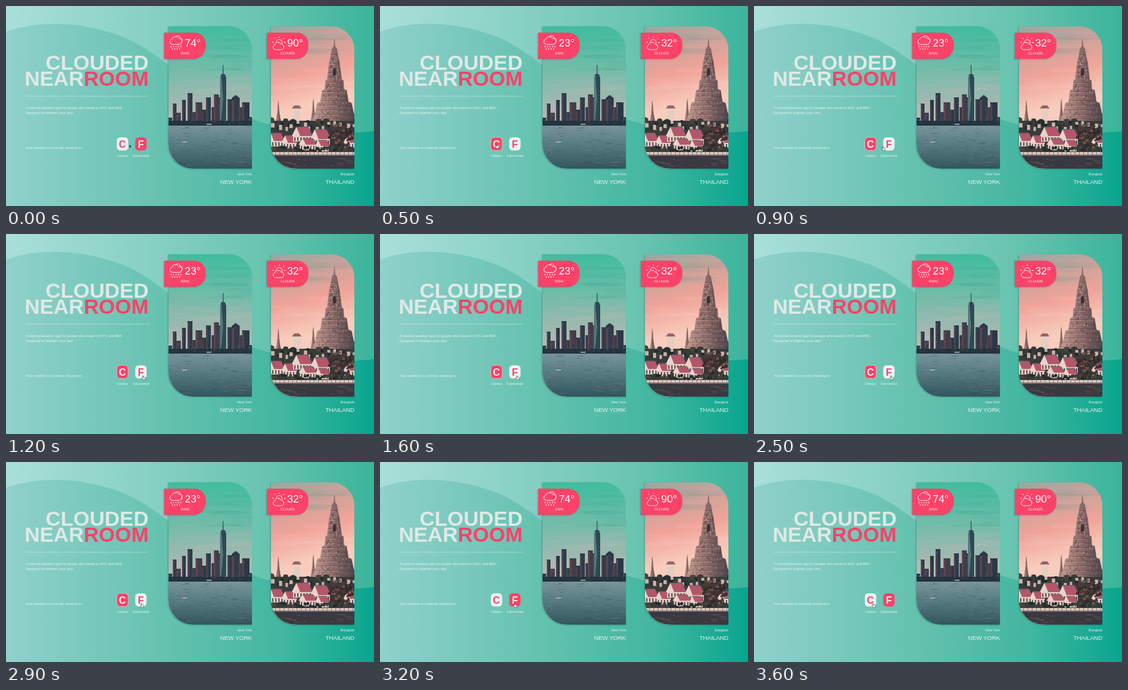
Animation of 600 by 326 pixels, one loop 3700 ms. Source, as an HTML page:

```html
<!DOCTYPE html>
<html lang="en">
<head>
<meta charset="utf-8">
<title>Weather app</title>
<style>
html, body { margin: 0; width: 100%; height: 100%; overflow: hidden; background: #6fc5b3; }
svg { display: block; width: 100vw; height: 100vh; }
text { font-family: "Liberation Sans", Arial, sans-serif; fill: #e6f3ef; font-size: 5.7px; }
.title { font-size: 34px; font-weight: bold; text-anchor: end; fill: #dfe9e7; }
.title tspan { fill: #fc4268; }
.temp { font-size: 17px; fill: #fff; }
.sky { text-anchor: middle; fill: #fff; }
.place { text-anchor: end; }
.big { font-size: 9.9px; letter-spacing: -.2px; }
.mid { text-anchor: middle; }
.key { font-size: 16px; font-weight: bold; text-anchor: middle; }
.icon { fill: none; stroke: #fff; stroke-width: .9; stroke-linecap: round; stroke-linejoin: round; }
.card { filter: drop-shadow(-1px 1.5px 1.2px rgba(0, 50, 45, .3)); }

.cel, .fah, .arrow, .hand { animation: 3700ms step-end infinite; }
.cel { animation-name: cel; }
.fah { animation-name: fah; }
.arrow { animation-name: arrow; }
.hand { animation-name: hand; }
.cursor { animation: move 3700ms infinite; }
@keyframes cel { 0% { opacity: 0 } 10.811% { opacity: 1 } 81.081%, 100% { opacity: 0 } }
@keyframes fah { 0% { opacity: 1 } 10.811% { opacity: 0 } 81.081%, 100% { opacity: 1 } }
@keyframes arrow { 0% { opacity: 1 } 2.703%, 100% { opacity: 0 } }
@keyframes hand { 0% { opacity: 0 } 2.703%, 100% { opacity: 1 } }
@keyframes move {
  0% { transform: translate(201px, 225.5px); animation-timing-function: steps(3) }
  8.108%, 16.216% { transform: translate(189px, 225.5px); animation-timing-function: steps(5) }
  29.73%, 72.973% { transform: translate(222.5px, 231px); animation-timing-function: steps(3) }
  81.081%, 89.189% { transform: translate(218.5px, 230px); animation-timing-function: steps(3) }
  97.297%, 100% { transform: translate(193.5px, 230.5px); animation-timing-function: step-end }
}
</style>
</head>
<body>
<svg viewBox="0 0 600 326" preserveAspectRatio="none">
  <defs>
    <linearGradient id="back"><stop stop-color="#a9dfda"/><stop offset=".4" stop-color="#86d0c3"/><stop offset=".72" stop-color="#66c3ae"/><stop offset="1" stop-color="#3ab49b"/></linearGradient>
    <linearGradient id="wave"><stop stop-color="#90d1cb"/><stop offset=".45" stop-color="#63c1ae"/><stop offset=".75" stop-color="#42b6a0"/><stop offset="1" stop-color="#08a58e"/></linearGradient>
    <linearGradient id="dusk" x2="0" y2="1"><stop stop-color="#40bd9c"/><stop offset=".4" stop-color="#6fbca8"/><stop offset=".75" stop-color="#a0b8b0"/><stop offset="1" stop-color="#bfb8b5"/></linearGradient>
    <linearGradient id="bay" x2="0" y2="1"><stop stop-color="#7b979b"/><stop offset=".4" stop-color="#5b7f86"/><stop offset="1" stop-color="#33555c"/></linearGradient>
    <linearGradient id="rose" x2=".15" y2="1"><stop stop-color="#91aaa3"/><stop offset=".2" stop-color="#cda39b"/><stop offset=".38" stop-color="#f0a399"/><stop offset=".62" stop-color="#f8cdbd"/></linearGradient>
    <linearGradient id="stone"><stop stop-color="#c79e92"/><stop offset=".45" stop-color="#8f6c69"/><stop offset="1" stop-color="#4b4149"/></linearGradient>
    <path id="frame" d="M0 0H98A38 38 0 0 1 136 38V232H40A40 40 0 0 1 0 192Z"/>
    <clipPath id="clip"><use href="#frame"/></clipPath>
    <path id="badge" d="M0 0H49A18 18 0 0 1 67.500 18V22.500A20 20 0 0 1 47.500 42.500H0Z" fill="#fd4268"/>
  </defs>

  <rect width="600" height="326" fill="url(#back)"/>
  <path d="M0 42C40 27 110 20 190 50C260 78 320 155 401 184C460 206 530 211 600 204V326H0Z" fill="url(#wave)"/>

  <text class="title" x="232.500" y="104">CLOUDED</text>
  <text class="title" x="232.500" y="130">NEAR<tspan>ROOM</tspan></text>
  <path d="M32 147H233" stroke="#fff" stroke-opacity=".45" stroke-width=".8"/>
  <text x="32" y="168">A minimal weather app for people who based in NYC and BKK.</text>
  <text x="32" y="176.200">Designed to brighten your day!</text>
  <text x="32" y="233">Your weather is currently showing in:</text>
  <text class="mid" x="190" y="245.500">Celsius</text>
  <text class="mid" x="220" y="245.500">Fahrenheit</text>

  <g transform="translate(265 33)">
    <use class="card" href="#frame" fill="url(#dusk)"/>
    <g id="harbour" clip-path="url(#clip)">
      <rect width="136" height="162" fill="url(#dusk)"/>
      <rect y="160" width="136" height="72" fill="url(#bay)"/>
    </g>
  </g>
  <g transform="translate(432 33)">
    <use class="card" href="#frame" fill="url(#rose)"/>
    <g id="temple" clip-path="url(#clip)">
      <rect width="136" height="232" fill="url(#rose)"/>
    </g>
  </g>

  <use class="card" href="#badge" x="258" y="43.500"/>
  <use class="card" href="#badge" x="425.500" y="43.500"/>
  <g class="icon">
    <path d="M271 62.500A4.300 4.300 0 0 1 270.500 54A6 6 0 0 1 281.500 53A4.800 4.800 0 0 1 283 62.500Z"/>
    <path d="M276 50.500A4.500 4.500 0 0 1 284.200 52A4.300 4.300 0 0 1 285 60"/>
    <path d="M269 65V67M273 65V67M277 65V67M281 65V67M285 65V67M271 69V71M275 69V71M279 69V71M283 69V71" stroke-width="1"/>
    <path d="M438.500 71A4.200 4.200 0 0 1 438 63.200A5.800 5.800 0 0 1 448.500 62A4.800 4.800 0 0 1 450.500 71Z"/>
    <path d="M440.500 58.500A5 5 0 1 1 450 61.500M445.500 50V51.500M437.500 52L439 53.500M453.500 52L452 53.500M434.500 59H436.500M453.500 59.500H455.500M452 65L453.500 66.500"/>
  </g>
  <text class="sky" x="292" y="78.700">RAIN</text>
  <text class="sky" x="459" y="78.700">CLOUDS</text>

  <text class="place" x="401" y="276">New York</text>
  <text class="place big" x="401" y="289.500">NEW YORK</text>
  <text class="place" x="568" y="276">Bangkok</text>
  <text class="place big" x="568" y="289.500">THAILAND</text>

  <g id="states"></g>

  <g class="cursor">
    <path class="arrow" d="M0 0V6L1.400 4.800L2.300 6.800L3.200 6.400L2.300 4.400H4.200Z" fill="#111" stroke="#fff" stroke-width=".4"/>
    <path class="hand" d="M.4 .6Q1.100 -.2 1.700 .6V2.600L4.300 3.200Q5 3.500 4.800 4.500L4.200 6.700H1.200L-.9 4.200Q-.7 3.300 .4 4Z" fill="#fff" stroke="#222" stroke-width=".6"/>
  </g>
</svg>
<script>
const get = id => document.getElementById(id);
const add = (id, markup) => get(id).insertAdjacentHTML('beforeend', markup);
const rect = (x, y, w, h, fill, more = '') =>
  `<rect x="${x}" y="${y}" width="${w}" height="${h}" fill="${fill}" ${more}/>`;
const path = (d, fill, more = '') => `<path d="${d}" fill="${fill}" ${more}/>`;
const blob = (x, y, rx, ry, fill, more = '') =>
  `<ellipse cx="${x}" cy="${y}" rx="${rx}" ry="${ry}" fill="${fill}" ${more}/>`;

let seed = 7;
const rand = (lo = 0, hi = 1) => {
  seed = (seed * 16807) % 2147483647;
  return lo + (hi - lo) * seed / 2147483647;
};
const pick = list => list[Math.floor(rand(0, list.length))];
const many = (n, make) => Array.from({ length: n }, (_, i) => make(i)).join('');
const haze = (n, top, bottom, fill) => many(n, () =>
  blob(rand(0, 136), rand(top, bottom), rand(20, 50), rand(1.5, 4), fill, 'opacity=".1"'));

// Temperature and unit buttons, one layer per unit
function layer(cls, temps, celsius) {
  const key = (x, letter, on) =>
    rect(x, 214, 18.5, 21.5, on ? '#fd4268' : '#ebf1f0',
      `rx="5.500" stroke="#fff" stroke-opacity="${on && celsius ? .6 : 0}" stroke-width=".7"`) +
    `<text class="key" x="${x + 9.2}" y="230.500" style="fill:${on ? '#f4eeee' : '#f5446a'}">${letter}</text>`;
  add('states', `<g class="${cls}">
    <text class="temp" x="291.500" y="66">${temps[0]}°</text>
    <text class="temp" x="458.500" y="66">${temps[1]}°</text>
    ${key(180.7, 'C', celsius)}${key(210.7, 'F', !celsius)}</g>`);
}
layer('fah', [74, 90], false);
layer('cel', [23, 32], true);

// City skyline: x, width, top
const towers = [[-1, 7, 149], [7, 6, 126], [13, 7, 141], [22, 6, 120], [31, 8, 109], [39, 5, 140],
  [44, 11, 124], [55, 6, 136], [61, 8, 116], [70, 5, 132], [74, 8, 111], [82, 12, 116], [96, 7, 119],
  [103, 13, 117], [115, 5, 132], [120, 12, 124], [131, 6, 148]];
const shades = ['#2b3d49', '#333c49', '#403e4a', '#273944'];
add('harbour',
  haze(14, 20, 75, '#2f9f86') + haze(14, 70, 135, '#d3b9b8') +
  towers.map(([x, w, top], i) =>
    rect(x, top, w, 162 - top, shades[i % 4]) +
    rect(x, top + 2, w * .3, 160 - top, '#91505f', 'opacity=".4"') +
    many(8, () => rect(x + rand(0, w - 1), rand(top + 2, 158), 1, 1, pick(['#b77681', '#1e2d37']), 'opacity=".5"'))
  ).join('') +
  path('M110 117L103 122V117L109.500 112L116 117V122Z', '#2b3a45') +
  path('M84.500 162V84L86 78H92L94 84V162Z', '#2b4a55') +
  path('M86 78L89 118L85 162H84V84Z', '#58787b') +
  path('M88.700 78L89 63L89.400 78Z', '#2b4a55', 'stroke="#2b4a55" stroke-width=".6"') +
  rect(0, 154, 136, 8, '#22343d') +
  many(30, () => rect(rand(0, 134), rand(153, 160), rand(1, 3), 1, '#8f505f', 'opacity=".5"')) +
  many(190, () => {
    const y = rand(163, 232);
    return rect(rand(-5, 130), y, rand(3, 13), .6, pick(['#b18a95', '#2a424c', '#2a424c']), `opacity="${rand(.15, .5)}"`);
  }) +
  path('M22 188H31L29 189.500H23Z', '#b9c2c2') +
  rect(62, 159, 8, 1.4, '#c7c3c2'));

// Riverside temple: spire half-profile as y, half width
const spire = [[22, .4], [34, 1.4], [37, 4], [48, 6], [60, 8.5], [75, 10.5], [88, 12], [89, 14.5],
  [104, 16], [105, 20], [124, 23], [126, 28], [140, 31], [158, 37]];
const tower = (cx, top, kx, ky = kx) => {
  const at = ([y, w], side) => `${cx + side * w * kx} ${top + (y - 22) * ky}`;
  return path('M' + spire.map(p => at(p, -1)).join('L') + 'L' +
    [...spire].reverse().map(p => at(p, 1)).join('L') + 'Z', 'url(#stone)');
};
const halfAt = y => {
  const i = Math.max(1, spire.findIndex(p => p[0] >= y));
  const [[y0, w0], [y1, w1]] = [spire[i - 1], spire[i]];
  return w0 + (w1 - w0) * (y - y0) / (y1 - y0);
};
const roof = (x, y, w, h) =>
  path(`M${x} ${y + h}L${x + w * .22} ${y}H${x + w * .78}L${x + w} ${y + h}Z`, '#b4566a') +
  path(`M${x} ${y + h}L${x + w * .22} ${y}L${x + w * .4} ${y + h}Z`, '#ead3cb') +
  path(`M${x + w * .22} ${y}H${x + w * .78}L${x + w} ${y + h}`, 'none', 'stroke="#4c625b" stroke-width="1"') +
  rect(x + 2, y + h, w - 4, 9, '#e3c9c0') +
  many(Math.floor(w / 5), i => rect(x + 4 + i * 5, y + h + 2, 1.8, 6, '#4f464d'));
const leaves = ['#26332f', '#333c35', '#4a443d', '#1f2a2a'];
const bush = (x, y, r) => blob(x, y, r, r * .8, pick(leaves));

add('temple',
  haze(14, 8, 45, '#71918c') + haze(10, 55, 110, '#fbd8c8') +
  tower(12, 119, .13, .3) + tower(69, 116, .14, .32) + tower(103.5, 21, 1) +
  many(15, i => {
    const y = 46 + i * 7.5, w = halfAt(y);
    return rect(103.5 - w, y, w * 2, 1, '#3b343c', 'opacity=".45"') +
      rect(103.5 - w, y + 1, w * 1.2, .8, '#e3bdae', 'opacity=".6"');
  }) +
  many(150, () => {
    const y = rand(48, 155), w = halfAt(y) - 1;
    return rect(103.5 + rand(-w, w), y, 1.2, rand(1.5, 4), pick(['#dcb3a6', '#3b343c', '#3b343c']), 'opacity=".5"');
  }) +
  path('M101 80H106V71L103.500 67L101 71Z', '#383039') +
  rect(36, 134, 12, 22, '#e6cdc2') + path('M34 134L38 129H46L50 134Z', '#9b6265') +
  rect(0, 154, 136, 55, '#3a3b3b') +
  many(24, i => bush(i * 6, rand(152, 166), rand(3, 6))) +
  many(14, i => rect(i * 10 + rand(0, 4), rand(152, 165), rand(3, 6), rand(4, 9), '#cfb1a8')) +
  roof(-7, 174, 30, 13) + roof(17, 178, 27, 12) + roof(34, 164, 34, 15) + roof(64, 168, 34, 16) +
  roof(45, 183, 30, 10) + roof(72, 186, 24, 9) + roof(118, 178, 28, 12) +
  many(75, () => {
    const a = rand(0, 6.28), r = Math.sqrt(rand());
    return blob(114 + Math.cos(a) * r * 19, 180 + Math.sin(a) * r * 21, rand(2, 4), rand(1.5, 3),
      pick(['#3b302f', '#4d3836', '#74504b', '#2a2a2a']));
  }) +
  many(34, i => bush(i * 4, rand(197, 203), rand(2, 4))) +
  rect(0, 205, 136, 6, '#dcc6bc') + rect(0, 209, 136, 2, '#84757a') +
  many(20, i => rect(i * 7, 205, .8, 5, '#716569')) +
  rect(0, 211, 136, 21, '#3b3940') +
  many(55, () => rect(rand(-5, 130), rand(212, 232), rand(4, 12), .7, pick(['#a48180', '#28292f']), 'opacity=".45"')));
</script>
</body>
</html>
```
